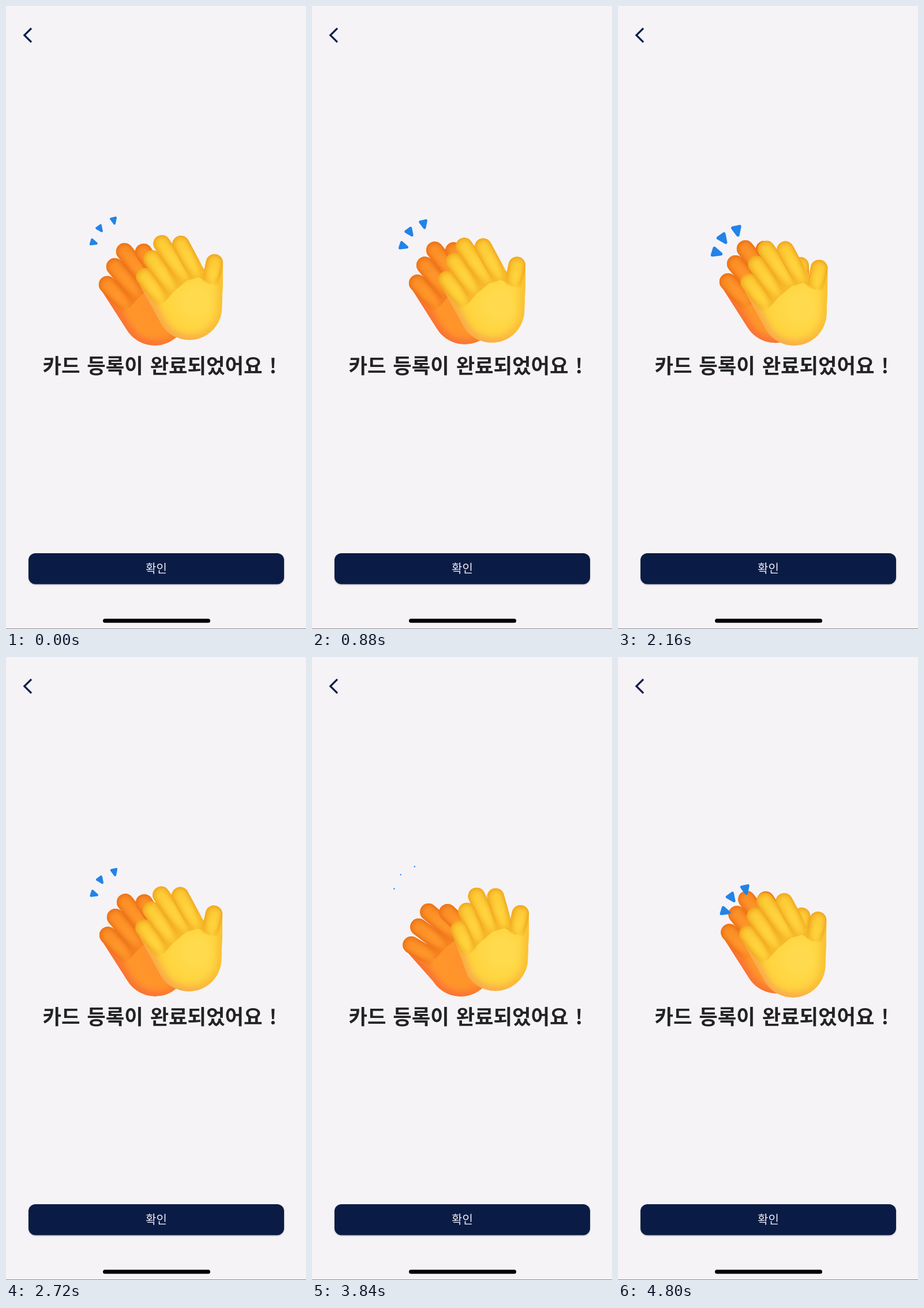
Recreate the animation shown at these times as an HTML page with a canvas. Size 520 px wide and 1077 px high, loop 4880 ms.

```html
<!DOCTYPE html>
<html lang="ko">
<head>
<meta charset="utf-8">
<style>
html, body { margin: 0; width: 100%; height: 100%; overflow: hidden; background: #f5f3f6; }
svg, canvas { position: absolute; left: 0; top: 0; width: 520px; height: 1077px; }
text { font-family: "Noto Sans CJK KR", "Noto Sans CJK", sans-serif; }
.title { font-size: 35.3px; font-weight: 900; word-spacing: 2px; fill: #232326; }
.label { font-size: 20px; font-weight: 500; fill: #f1eff6; text-anchor: middle; }
.button { fill: #0a1c45; filter: drop-shadow(0 1px 1px #0004); }
</style>
</head>
<body>
<svg viewBox="0 0 520 1077">
  <polyline points="44,38.5 31.8,50.5 44,62.5" fill="none" stroke="#0d1f4a" stroke-width="3.2"/>
  <text class="title" x="63.5" y="635">카드 등록이 완료되었어요 !</text>
  <rect class="button" x="39" y="946" width="443" height="53.5" rx="12"/>
  <text class="label" x="260.5" y="980">확인</text>
  <rect x="168" y="1059.3" width="186" height="7" rx="3.5"/>
  <rect y="1076" width="520" height="1" fill="#8d8c90"/>
</svg>
<canvas width="520" height="1077"></canvas>
<script>
const ctx = document.querySelector('canvas').getContext('2d');
const LOOP = 4880, STEP = 80, CLAP = 448, REST = 170, START = 490, SHIFT = 1216;
const PALM = 56.5;

// Both hands share one shape, measured from the palm centre: little finger to thumb.
const tips = [[-79, -51], [-66, -82], [-49, -108], [-16, -107], [43.5, -77]];
const bases = [[-44, -8], [-26, -28], [-4, -46], [16, -52], [36, -40]];

// closed/open: palm centre; nudge and bend: finger offset at rest and when spread
const front = {
  closed: [303, 532], open: [320, 519], nudge: [1, -2], bend: [17, 3],
  edge: [242, 170, 32], light: [255, 211, 60], glow: [255, 218, 76], rim: [248, 160, 82]
};
const back = {
  closed: [275, 525], open: [255, 531], nudge: [-3, 2], bend: [-4, 18],
  edge: [238, 116, 24], light: [255, 150, 42], glow: [255, 146, 44], rim: [250, 104, 60]
};

const rgb = (c, a = 1) => `rgba(${c.map(Math.round)},${a})`;
const mix = (a, b, u) => a.map((v, i) => v + (b[i] - v) * u);
const add = (a, b, k = 1) => a.map((v, i) => v + b[i] * k);

function ease(from, to, t) {
  const u = Math.min(1, Math.max(0, (t - from) / (to - from)));
  return u * u * (3 - 2 * u);
}

function stroke(a, b, width, stops) {
  const g = ctx.createLinearGradient(...a, ...b);
  for (const [at, colour] of stops) g.addColorStop(at, colour);
  ctx.strokeStyle = g;
  ctx.lineWidth = width;
  ctx.beginPath();
  ctx.moveTo(...a);
  ctx.lineTo(...b);
  ctx.stroke();
}

// Rounded finger that melts into the palm at its base
function finger({ tip, base }, { edge, light }) {
  const n = 9;
  for (let i = 0; i < n; i++) {
    const u = i / (n - 1), k = 1 - (1 - u) ** 2, shift = [u * 1.6, u * 1.6];
    stroke(add(tip, shift), add(base, shift), 29.5 * (1 - .85 * u), [
      [0, rgb(mix(edge, light, k * .85))],
      [.4, rgb(mix(edge, light, k))],
      [1, rgb(mix(edge, light, k), 0)]
    ]);
  }
}

function hand(look, move, spread) {
  const centre = mix(look.closed, look.open, move);
  const [cx, cy] = centre;
  const offset = add(look.nudge, look.bend, spread);
  const fingers = tips.map((tip, i) => ({
    tip: add(centre, i < 4 ? add(tip, offset) : tip),
    base: add(centre, bases[i]),
    look: i < 4 ? look : front
  }));
  for (const f of fingers)
    stroke(f.tip, f.base, 29.5, [[0, rgb(f.look.edge)], [1, rgb(f.look.light)]]);

  const [little, , , , thumb] = fingers;
  const dir = Math.atan2(little.base[1] - little.tip[1], little.base[0] - little.tip[0]);
  const rim = new Path2D();
  rim.moveTo(little.tip[0] - Math.sin(dir) * 14, little.tip[1] + Math.cos(dir) * 14);
  rim.arc(cx, cy, PALM, 2.58, -.05, true);
  rim.quadraticCurveTo(cx + PALM + 2, cy - 40, thumb.tip[0] + 14.7, thumb.tip[1] + 2);

  // Palm closed off at fraction u of the way from the knuckles to the tips
  const outline = u => {
    const path = new Path2D(rim);
    for (const f of [...fingers].reverse()) path.lineTo(...mix(f.base, f.tip, u));
    path.closePath();
    return path;
  };
  ctx.fillStyle = rgb(mix(look.edge, look.light, .4));
  ctx.fill(outline(.5));

  const palm = outline(0);
  const g = ctx.createRadialGradient(cx + 12, cy - 10, 20, cx + 12, cy - 10, 95);
  g.addColorStop(0, rgb(look.glow));
  g.addColorStop(.5, rgb(look.light));
  g.addColorStop(1, rgb(mix(look.light, look.edge, .6)));
  ctx.fillStyle = g;
  ctx.fill(palm);

  const side = ctx.createLinearGradient(cx, 0, cx + PALM, 0);
  side.addColorStop(0, rgb(look.rim));
  side.addColorStop(1, rgb(mix(look.edge, look.light, .4)));
  ctx.save();
  ctx.clip(palm);
  ctx.filter = 'blur(7px)';
  ctx.strokeStyle = side;
  ctx.lineWidth = 13;
  ctx.stroke(rim);
  ctx.restore();

  for (const i of [4, 2, 3, 1, 0]) finger(fingers[i], fingers[i].look);
}

function spark(x, y, angle, scale) {
  ctx.save();
  ctx.translate(x, y);
  ctx.rotate(angle);
  ctx.scale(scale, scale);
  ctx.fillStyle = ctx.strokeStyle = '#2283e8';
  ctx.lineWidth = 6;
  ctx.beginPath();
  ctx.moveTo(-6.5, -6.5);
  ctx.lineTo(8, 0);
  ctx.lineTo(-6.5, 6.5);
  ctx.closePath();
  ctx.fill();
  ctx.stroke();
  ctx.restore();
}

// Three sparks fly off with decaying speed while they shrink.
function sparks(phase) {
  const age = phase > CLAP - 40 ? phase - CLAP : phase;
  const scale = Math.min(.85 + age / 50, 1.06 - age / 410);
  if (scale <= 0) return;
  const fall = Math.exp(-age / 120);
  const x = 141 + 45 * fall, y = 399 + 41 * fall;
  spark(x, y, .3, scale);
  spark(x + 11, y - 24, .95, scale);
  spark(x + 35, y - 38, 1.35, scale);
}

function draw(time) {
  const t = Math.floor(time % LOOP / STEP) * STEP;
  const phase = t < START ? REST : (t - SHIFT + CLAP * 4) % CLAP;
  const move = ease(0, 220, phase) - ease(365, CLAP, phase);
  const spread = ease(160, 280, phase) - ease(370, CLAP, phase);
  ctx.clearRect(0, 0, 520, 1077);
  ctx.lineCap = ctx.lineJoin = 'round';
  hand(back, move, spread);
  hand(front, move, spread);
  sparks(phase);
}

function tick() {
  draw(performance.now());
  requestAnimationFrame(tick);
}
tick();
</script>
</body>
</html>
```
